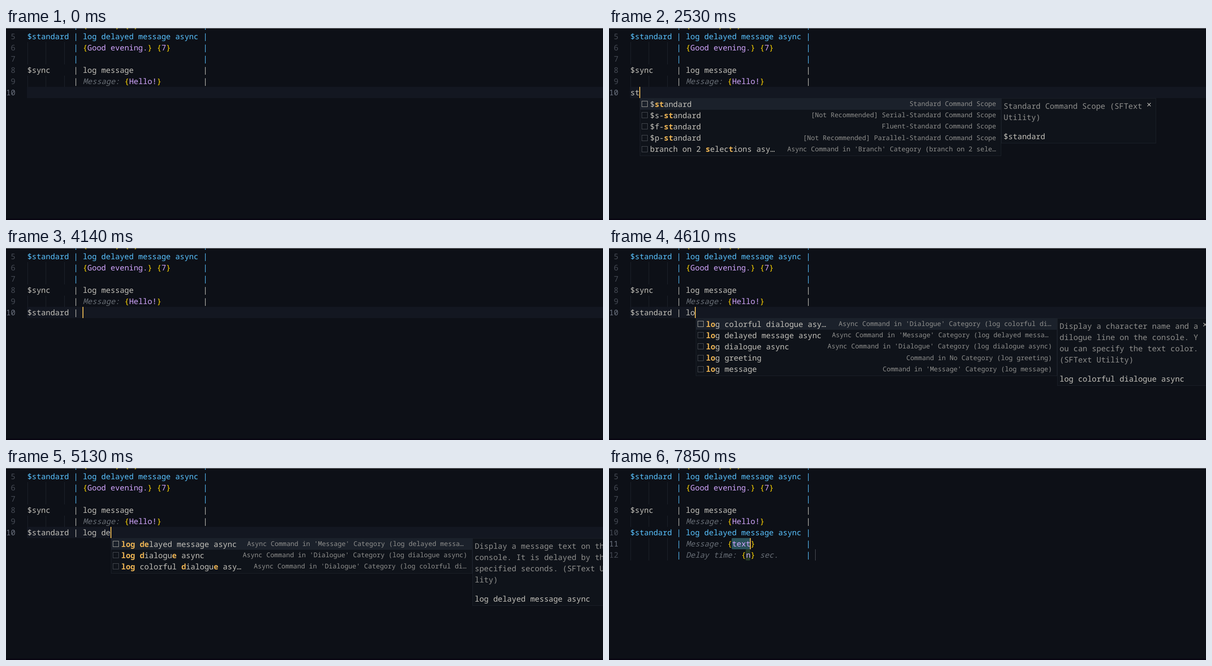
An HTML page that plays this animation: 1280 px wide and 411 px high, repeating every 8000 ms.

```html
<!DOCTYPE html>
<html lang="en">
<head>
<meta charset="utf-8">
<title>Editor completion</title>
<style>
  html, body { margin: 0; width: 100%; height: 100%; overflow: hidden; background: #0d1017; }
  svg { display: block; }
  text {
    font: 500 16.533px "Noto Sans Mono", "DejaVu Sans Mono", monospace;
    white-space: pre;
    text-rendering: geometricPrecision;
    font-variant-ligatures: none;
  }
  .hint { font-style: italic; }
  .match { font-weight: 700; fill: #edb454; }
  .small { font-size: 14.083px; }
</style>
</head>
<body>
<svg id="stage" width="1280" height="411" viewBox="0 0 1280 411"></svg>
<script>
const LOOP = 8000, LEFT = 45.65, ADVANCE = 9.92, ROW = 24;
const LIST_WIDTH = 775, PANEL_WIDTH = 332, POPUP_TOP = 151, ITEM_ROW = 24.2;
const INK = '#c3c1ba', BLUE = '#59c2ff', PURPLE = '#d2a6ff', GOLD = '#ffd700';
const HINT = '#686e76', MUTED = '#8f8f8d', CURSOR = '#e6b450', GUIDE = '#1e232c';
const BORDER = '#1b2029', WIDGET = '#0f131a';

const colX = col => LEFT + col * ADVANCE;
const lineTop = n => 6 + (n - 5) * ROW;

const rect = (x, y, w, h, fill, more = '') =>
  `<rect x="${x}" y="${y}" width="${w}" height="${h}" fill="${fill}" ${more}/>`;
const text = (x, y, str, fill, more = '') =>
  `<text x="${x}" y="${y}" fill="${fill}" ${more}>${str}</text>`;
const put = (n, col, str, fill = INK) =>
  text(colX(col), lineTop(n) + 18, str, fill, fill === HINT ? 'class="hint"' : '');

const pipes = (n, fill) => put(n, 10, '|', fill) + put(n, 38, '|', fill);
const lineNumber = (n, active) =>
  text(20.2, lineTop(n) + 18, n, active ? '#6c7380' : '#464b55', 'text-anchor="end"');
const guides = (first, last) => [0, 4, 8].map(col =>
  rect(Math.round(colX(col)), lineTop(first), 1, (last - first + 1) * ROW, GUIDE)).join('');

// A value in gold braces, starting at the given column.
const braced = (n, col, value) =>
  put(n, col, '{', GOLD) + put(n, col + 1, value, PURPLE) +
  put(n, col + 1 + value.length, '}', GOLD);

const writtenLines = [
  guides(6, 7), guides(9, 9),
  pipes(4, BLUE), braced(4, 12, 'Hello.'), braced(4, 21, '5'),
  put(5, 0, '$standard', BLUE), put(5, 12, 'log delayed message async', BLUE), pipes(5, BLUE),
  braced(6, 12, 'Good evening.'), braced(6, 28, '7'), pipes(6, BLUE),
  pipes(7, BLUE),
  put(8, 0, '$sync'), put(8, 12, 'log message'), pipes(8, INK),
  put(9, 12, 'Message: ', HINT), braced(9, 21, 'Hello!'), pipes(9, INK),
  [5, 6, 7, 8, 9].map(n => lineNumber(n)).join('')
].join('');

// Label, detail, and the slack a shortened detail leaves at its right.
const ITEMS = {
  standard: ['$standard', 'Standard Command Scope'],
  sync: ['$sync', 'Sync Command Scope'],
  sStandard: ['$s-standard', '[Not Recommended] Serial-Standard Command Scope'],
  sForced: ['$s-forced', '[Not Recommended] Serial-Forced Command Scope'],
  sPromised: ['$s-promised', '[Not Recommended] Serial-Promised Command Scope'],
  serial: ['$serial', 'Serial Command Scope'],
  fStandard: ['$f-standard', 'Fluent-Standard Command Scope'],
  pStandard: ['$p-standard', '[Not Recommended] Parallel-Standard Command Scope'],
  branch2: ['branch on 2 selections asy…', "Async Command in 'Branch' Category (branch on 2 sele…"],
  branch3: ['branch on 3 selections asy…', "Async Command in 'Branch' Category (branch on 3 sele…"],
  colorful: ['log colorful dialogue asy…', "Async Command in 'Dialogue' Category (log colorful di…", 1.5],
  delayed: ['log delayed message async', "Async Command in 'Message' Category (log delayed messa…", 7.5],
  dialogue: ['log dialogue async', "Async Command in 'Dialogue' Category (log dialogue async)"],
  greeting: ['log greeting', 'Command in No Category (log greeting)'],
  message: ['log message', "Command in 'Message' Category (log message)"]
};

const LISTS = {
  all: 'standard sync serial sStandard sForced sPromised fStandard pStandard branch2 branch3',
  scopes: 'standard sStandard fStandard pStandard branch2',
  logs: 'colorful delayed dialogue greeting message',
  narrowed: 'delayed dialogue colorful',
  single: 'delayed'
};

const DOCS = {
  standard: [['Standard Command Scope (SFText', 'Utility)'], '$standard'],
  colorful: [['Display a character name and a', 'dilogue line on the console. Y',
    'ou can specify the text color.', '(SFText Utility)'], 'log colorful dialogue async'],
  delayed: [['Display a message text on the ', 'console. It is delayed by the ',
    'specified seconds. (SFText Uti', 'lity)'], 'log delayed message async']
};

// Marks a contiguous match if there is one, otherwise the letters in order.
function highlight(label, query) {
  const start = label.indexOf(query);
  let next = 0;
  return [...label].map((ch, i) => {
    const hit = start >= 0 ? i >= start && i < start + query.length : ch === query[next];
    if (hit) next++;
    return hit ? `<tspan class="match">${ch}</tspan>` : ch;
  }).join('');
}

function popup(listName, query, col) {
  const keys = LISTS[listName].split(' ');
  const x = Math.round(colX(col)) + 1, right = x + LIST_WIDTH;
  const frame = (fx, w, h) =>
    rect(fx + .5, POPUP_TOP - .5, w, h, WIDGET, `stroke="${BORDER}"`);

  let out = frame(x, LIST_WIDTH - 1, Math.round(keys.length * ITEM_ROW) + 2);
  keys.forEach((key, i) => {
    const [label, detail, slack = 0] = ITEMS[key];
    const y = POPUP_TOP + i * ITEM_ROW;
    if (!i) out += rect(x + 1, y, LIST_WIDTH - 2, ROW, '#1b212b');
    out += rect(x + 4.5, Math.round(y) + 5.5, 12, 12, 'none',
      `stroke="${i ? '#484c53' : '#a09f9a'}"`);
    out += text(x + 22, y + 17.5, highlight(label, query), INK);
    out += text(right - 11 - slack, y + 16, detail, MUTED, 'class="small" text-anchor="end"');
  });

  const [lines, title] = DOCS[keys[0]];
  out += frame(right, PANEL_WIDTH - 1, (lines.length + 2) * ROW);
  lines.forEach((line, i) => { out += text(right + 5, 172.7 + i * ROW, line, MUTED); });
  out += text(right + 5, 189.5 + lines.length * ROW, title, INK);
  const cx = right + 317, cy = 164;
  out += `<path d="M${cx - 3.5} ${cy - 3.5}l7 7m0 -7l-7 7" stroke="${INK}" stroke-width="1.2"/>`;
  return out;
}

function typing({ line, caret, list, query }) {
  const col = line.length;
  return rect(45, lineTop(10), 1235, ROW, '#131721') + writtenLines +
    lineNumber(10, true) + put(10, 0, line) +
    (caret ? rect(Math.floor(colX(col)), lineTop(10), 2, ROW, CURSOR) : '') +
    (list ? popup(list, query, col) : '');
}

function snippet({ caret, fill }) {
  const box = (n, col, len, color) =>
    rect(Math.floor(colX(col)), lineTop(n), len * ADVANCE, ROW, color, 'rx="2"');
  return guides(11, 12) + writtenLines +
    box(11, 22, 4, '#2b525c') + box(12, 25, 1, '#243826') +
    rect(442, lineTop(12), 1, ROW, '#50545a') +
    put(10, 0, '$standard', fill) + put(10, 12, 'log delayed message async', fill) +
    put(11, 12, 'Message: ', HINT) + braced(11, 21, 'text') +
    put(12, 12, 'Delay time: ', HINT) + braced(12, 24, 'n') + put(12, 28, 'sec.', HINT) +
    [10, 11, 12].map(n => pipes(n, fill) + lineNumber(n, n === 11)).join('') +
    (caret ? rect(302, lineTop(11), 2, ROW, CURSOR) : '');
}

const HEAD = '$standard | ';
const typed = (time, line, caret = true) => ({ time, line, caret });
const suggest = (time, query, list, head = '') =>
  ({ time, line: head + query, caret: true, list, query });

const TIMELINE = [
  typed(0, '', false), typed(550, ''), typed(1080, '', false),
  typed(1540, ''), typed(2070, '', false),
  typed(2330, 's'),
  suggest(2400, 's', 'all'),
  suggest(2530, 'st', 'scopes'),
  suggest(2660, 'sta', 'scopes'),
  suggest(2790, 'stan', 'scopes'),
  typed(3140, '$standard'), typed(3660, '$standard', false),
  typed(3750, '$standard '), typed(4000, '$standard |'), typed(4140, HEAD),
  suggest(4410, 'l', 'logs', HEAD),
  suggest(4610, 'lo', 'logs', HEAD),
  suggest(4740, 'log', 'logs', HEAD),
  suggest(4870, 'log ', 'logs', HEAD),
  suggest(5000, 'log d', 'narrowed', HEAD),
  suggest(5130, 'log de', 'narrowed', HEAD),
  suggest(5260, 'log del', 'single', HEAD),
  { ...suggest(5720, 'log del', 'single', HEAD), caret: false },
  typed(6190, HEAD + 'log delayed message async'),
  typed(6720, HEAD + 'log delayed message async', false),
  { time: 6860, caret: true, fill: INK },
  { time: 6920, caret: true, fill: BLUE },
  { time: 7390, caret: false, fill: BLUE },
  { time: 7850, caret: true, fill: BLUE }
];

const stage = document.getElementById('stage');
const edges = rect(0, 0, 1280, 1, '#8b8d90') + rect(0, 408, 1280, 3, '#080511');
let shown = null;

function render(time) {
  const state = TIMELINE.findLast(s => s.time <= time);
  if (state === shown) return;
  shown = state;
  stage.innerHTML = rect(0, 0, 1280, 411, '#0d1017') +
    (state.fill ? snippet(state) : typing(state)) + edges;
}

const began = performance.now();
function tick() {
  render((performance.now() - began) % LOOP);
  requestAnimationFrame(tick);
}
tick();
</script>
</body>
</html>
```
